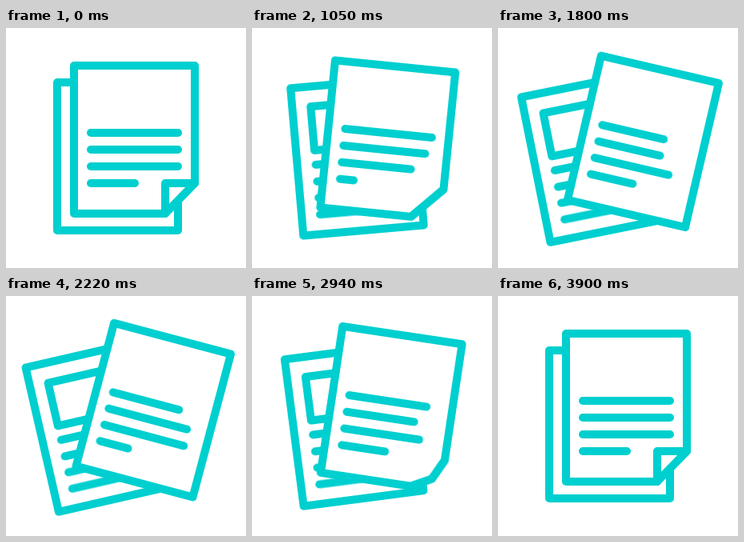
An HTML page for the animation above (4500 ms loop, 300x300 px).

```html
<!DOCTYPE html>
<html lang="en">
<head>
<meta charset="utf-8">
<title>Documents</title>
<style>
  html, body { margin: 0; width: 100%; height: 100%; overflow: hidden; background: #fff; }
  svg {
    display: block; width: 100%; height: 100%;
    fill: none; stroke: #00cfcf; stroke-width: 10;
    stroke-linecap: round; stroke-linejoin: round;
  }
  .page { fill: #fff; }
  .back, .front, .sheet, .flap, .text path { animation: 4500ms linear infinite; }

  /* Both pages pivot on the middle of their bottom edge. */
  .back  { --tilt: -13deg; transform-origin: 139.5px 253px; animation-name: fan; }
  .front { --tilt: 15deg; transform-origin: 160.5px 232px; animation-name: fan; }
  @keyframes fan {
    0% { transform: rotate(0deg); }
    7.333% { transform: rotate(0deg); animation-timing-function: cubic-bezier(.25, 0, .57, 1); }
    52.222% { transform: rotate(var(--tilt)); animation-timing-function: cubic-bezier(.36, 0, .69, 1); }
    80%, 100% { transform: rotate(0deg); }
  }

  /* The dog-ear flattens onto its crease, then opens out to a full corner. */
  .sheet { animation-name: sheet; }
  @keyframes sheet {
    0%, 23.333%, 69.556%, 100% { d: path("M199 232L85 232L85 47L236 47L236 194L217.5 213Z"); }
    39.556%, 56.667% { d: path("M199 232L85 232L85 47L236 47L236 194L236 232Z"); }
  }
  .flap { animation-name: flap; }
  @keyframes flap {
    0%, 7.333%, 84.444%, 100% { d: path("M199 232L199 194L236 194"); }
    23.333%, 69.556% { d: path("M199 232L217.5 213L236 194"); }
    39.556%, 56.667% { d: path("M199 232L236 232L236 194"); }
  }

  /* Each line shortens by the same amount, the lower ones earlier. */
  .text path { stroke-dasharray: 109 300; animation-name: shorten; animation-delay: calc(var(--i) * -300ms); }
  .text .short { stroke-dasharray: 55 300; }
  @keyframes shorten {
    0%, 27.333%, 59.333%, 85.556%, 100% { stroke-dashoffset: 0; }
    43.333% { stroke-dashoffset: 38; }
    73.111% { stroke-dashoffset: 26; }
  }
</style>
</head>
<body>
<svg viewBox="0 0 300 300">
  <g class="back">
    <path class="page" d="M64 68H215V253H64Z"/>
    <path d="M87 93H192V148H87Z"/>
    <path d="M87 166H192M87 187H192M87 207.5H192M87 228.5H192"/>
  </g>
  <g class="front">
    <path class="page sheet" d="M199 232L85 232L85 47L236 47L236 194L217.5 213Z"/>
    <path class="flap" d="M199 232L199 194L236 194"/>
    <g class="text">
      <path style="--i:0" d="M106 131H215"/>
      <path style="--i:1" d="M106 152H215"/>
      <path style="--i:2" d="M106 173H215"/>
      <path style="--i:3" class="short" d="M106 194H161"/>
    </g>
  </g>
</svg>
</body>
</html>
```
